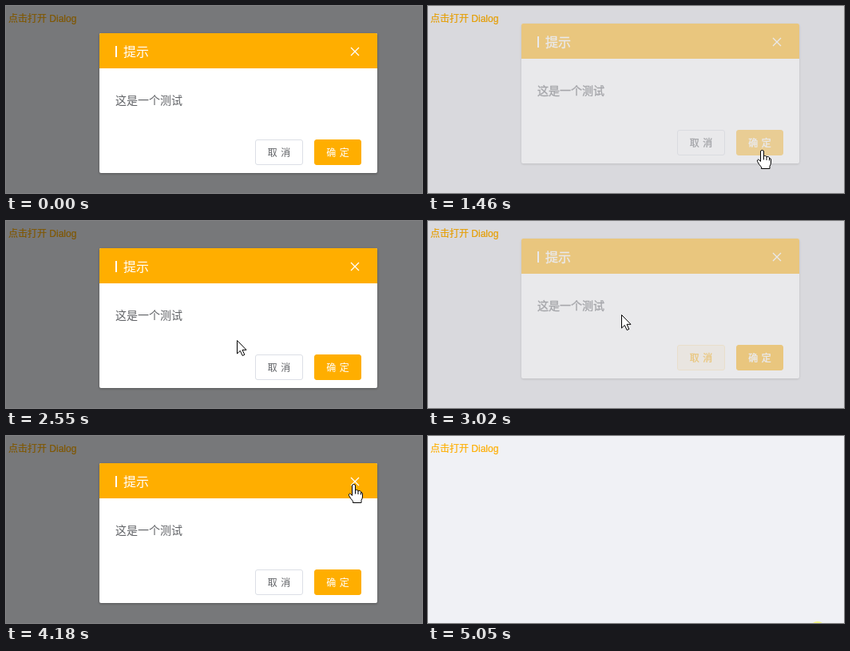
An HTML page for the animation above (5.12 s loop, 521 by 234 pixels).

```html
<!DOCTYPE html>
<html lang="zh-CN">
<head>
<meta charset="utf-8">
<title>Dialog</title>
<style>
html, body { margin: 0; width: 100%; height: 100%; overflow: hidden; }
body {
  position: relative;
  background: #f0f1f5;
  font-family: "Liberation Sans", "Noto Sans CJK SC", sans-serif;
  font-size: 12px;
  cursor: default;
}
body * { position: absolute; box-sizing: border-box; white-space: nowrap; }
#link { left: 3px; top: 6px; line-height: 20px; color: #ffae00; -webkit-text-stroke: .2px; }
#modal { inset: 0; background: #000; }
#dialog {
  left: 117px; top: 34px; width: 348px; height: 175px;
  background: #fff; border-radius: 2px;
  box-shadow: 0 1px 3px rgba(0, 0, 0, .3);
}
#dialog.fading { -webkit-text-stroke: .35px; }
.head { left: 0; top: 0; width: 100%; height: 44px; background: #ffae00; border-radius: 2px 2px 0 0; }
.bar { left: 20px; top: 16px; width: 2px; height: 14px; background: #fff; }
.title { left: 30px; top: 12px; font-size: 16px; line-height: 24px; color: #fff; }
.close { left: 315px; top: 18px; width: 10px; height: 10px; overflow: visible; fill: none; stroke: #fff; stroke-width: 1.3; }
.text { left: 20px; top: 74px; font-size: 14px; line-height: 20px; color: #606266; }
.btn {
  top: 133px; height: 32px; border: 1px solid; border-radius: 3px;
  line-height: 32px; text-align: center; word-spacing: 1px;
}
#no { left: 195px; width: 60px; color: #606266; background: #fff; border-color: #dcdfe6; }
#no.hot { color: #ffae00; background: #fff7e6; border-color: #ffe7b3; }
#ok { left: 269px; width: 59px; color: #fff; background: #ffae00; border-color: #ffae00; }
#ok.hot { background: #ffbe33; border-color: #ffbe33; }
#cursor { left: 0; top: 0; width: 1px; height: 1px; overflow: visible; }
#cursor path { fill: #fff; stroke: #000; stroke-linejoin: round; }
#halo { fill: #ff0; fill-opacity: .47; }
</style>
</head>
<body>
<div id="link">点击打开 Dialog</div>
<div id="modal"></div>
<div id="dialog">
  <div class="head">
    <div class="bar"></div>
    <div class="title">提示</div>
    <svg class="close" viewBox="0 0 10 10"><path d="M0 0L10 10M10 0L0 10"/></svg>
  </div>
  <div class="text">这是一个测试</div>
  <div class="btn" id="no">取 消</div>
  <div class="btn" id="ok">确 定</div>
</div>
<svg id="cursor">
  <circle id="halo" r="10"/>
  <path id="arrow" d="M.5 .5V17L4.3 13.4L7.2 19.5L9.8 18.3L7 12.3H12Z"/>
  <path id="hand" d="M-2.5 14.5V2Q-2.5 .5-.5 .5T1.5 2V8Q2.2 7.2 3.7 7.6T5 9Q6 8 7.5 8.8T8.5 10.5Q10.2 10.3 10.5 12V16Q10.5 18 9 20.5V23.5H-1.5V21.5Q-4.5 18.5-6.5 14.5Q-7 12.5-5.5 12Q-4.5 12-2.5 14.5ZM1.5 8V12.5M5 9V13M8.5 10.5V13.5"/>
</svg>
<script>
const LOOP = 5120, STEP = 78, LEAD = 32, PRESS = 80;
const el = Object.fromEntries([...document.querySelectorAll('[id]')].map(e => [e.id, e]));

// Each click toggles the dialog; the last one falls outside the stage
const entry = { at: 510, x: 469, y: 228 };
const stops = [
  { from: 680, to: 1140, x: 419, y: 180, click: 1350 },
  { from: 1500, to: 2080, x: 84, y: 21, click: 2182 },
  { from: 2240, to: 2770, x: 335, y: 178, click: 2910 },
  { from: 2910, to: 3400, x: 80, y: 11, click: 3664 },
  { from: 3653, to: 4150, x: 436, y: 60, click: 4372 },
  { from: 4372, to: 4890, x: 488, y: 242, click: 5118 }
];

const clamp = v => Math.min(1, Math.max(0, v));
const easeOut = p => 1 - (1 - p) ** 2;

// CSS "ease": cubic-bezier(.25, .1, .25, 1)
function ease(x) {
  if (x <= 0 || x >= 1) return clamp(x);
  const bez = (a, b, s) => 3 * a * s * (1 - s) ** 2 + 3 * b * s * s * (1 - s) + s ** 3;
  let lo = 0, hi = 1;
  for (let i = 0; i < 24; i++) {
    const mid = (lo + hi) / 2;
    if (bez(.25, .25, mid) < x) lo = mid; else hi = mid;
  }
  return bez(.1, 1, lo);
}

function pointer(t) {
  let { x, y } = entry;
  for (const s of stops) {
    const k = easeOut(clamp((t - s.from) / (s.to - s.from)));
    x += (s.x - x) * k;
    y += (s.y - y) * k;
  }
  return { x, y };
}

function hit({ x, y }, shown) {
  const within = (l, t, r, b) => x >= l && x <= r && y >= t && y <= b;
  if (!shown) return within(4, 8, 89, 24) ? 'link' : '';
  if (within(312, 167, 372, 199)) return 'no';
  if (within(386, 167, 445, 199)) return 'ok';
  return within(430, 52, 439, 66) ? 'close' : '';
}

const toggle = (e, on) => { e.style.display = on ? '' : 'none'; };

function draw(t) {
  const done = stops.filter(s => s.click <= t);
  const latest = done[done.length - 1];
  const open = done.length % 2 === 0;
  const fade = ms => {
    const p = latest ? ease((t - latest.click) / ms) : 1;
    return open ? p : 1 - p;
  };

  const show = fade(300);
  el.modal.style.opacity = fade(200) / 2;
  el.dialog.style.opacity = show;
  el.dialog.style.transform = `translateY(${Math.floor(-20 * (1 - show))}px)`;
  el.dialog.classList.toggle('fading', show < 1);

  const pos = pointer(t), over = hit(pos, show > 0);
  const focus = open ? '' : hit(latest, true);
  for (const id of ['no', 'ok']) el[id].classList.toggle('hot', over === id || focus === id);

  el.cursor.style.transform = `translate(${Math.round(pos.x)}px, ${Math.round(pos.y)}px)`;
  toggle(el.cursor, t >= entry.at);
  toggle(el.arrow, !over);
  toggle(el.hand, over);
  toggle(el.halo, stops.some(s => t >= s.click - PRESS && t < s.click));
}

const start = performance.now();
function loop() {
  const t = (performance.now() - start) % LOOP;
  draw(Math.floor((t + LEAD) / STEP) * STEP - LEAD);
  requestAnimationFrame(loop);
}
loop();
</script>
</body>
</html>
```
